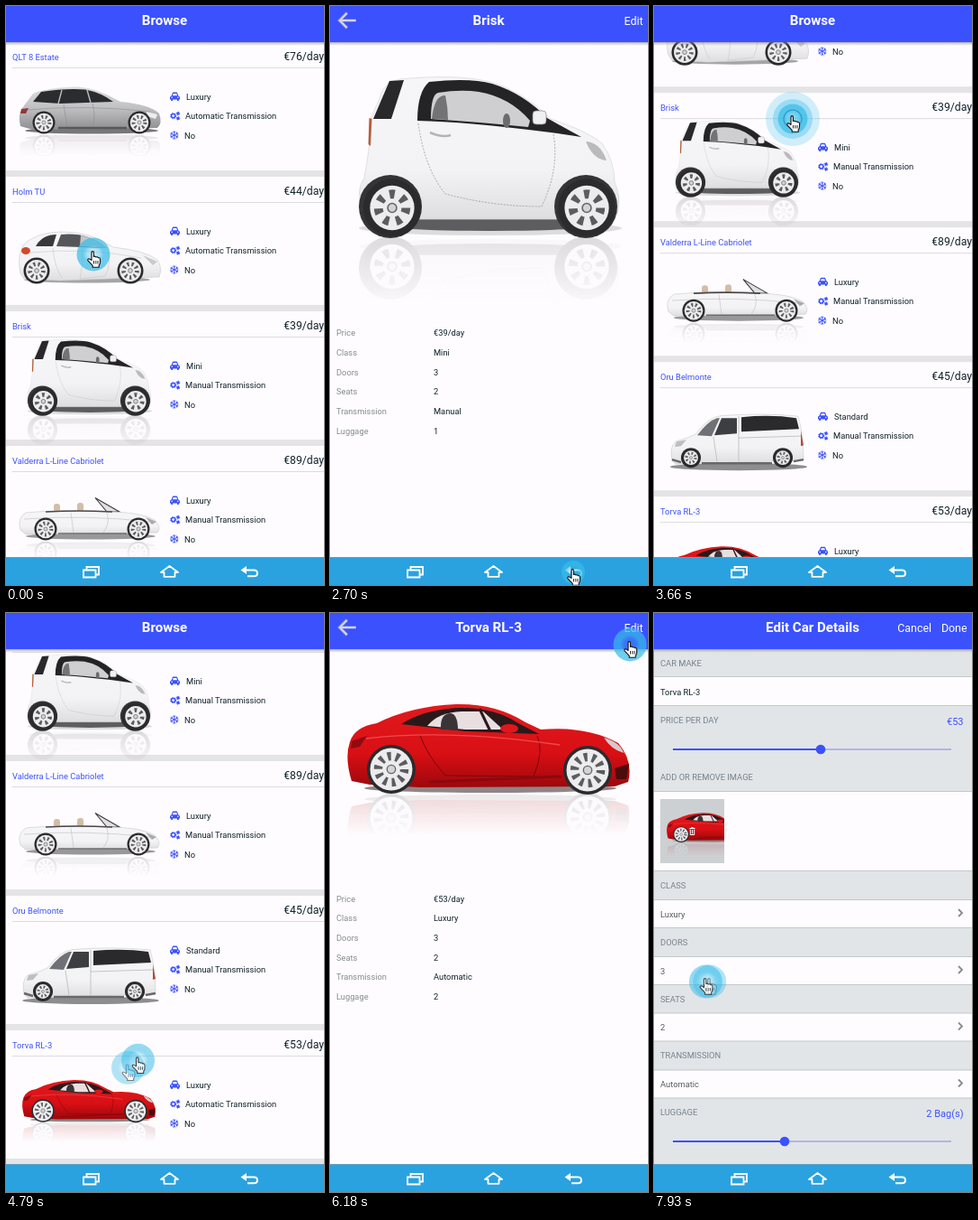
An HTML page that plays this animation: 353x641 px, repeating every 8000 ms.

```html
<!DOCTYPE html>
<html lang="en">
<head>
<meta charset="utf-8">
<title>Car browser</title>
<style>
html, body { margin: 0; width: 100%; height: 100%; overflow: hidden; background: #fefcfe; }
svg { display: block; }
text { font-family: Roboto, Arial, sans-serif; white-space: pre; }
</style>
</head>
<body>
<svg id="stage" width="353" height="641" viewBox="0 0 353 641"></svg>
<script>
const W = 353, LOOP = 8000;
const BLUE = '#3b51fe', INK = '#10222c', GREY = '#858b8f', PAGE = '#fefcfe';

// ---- drawing helpers ----
const text = (x, y, s, size = 9.35, fill = INK, anchor = 'start', weight = 400) =>
  `<text x="${x}" y="${y}" font-size="${size}" fill="${fill}" text-anchor="${anchor}" font-weight="${weight}">${s}</text>`;
const rect = (x, y, w, h, fill, more = '') =>
  `<rect x="${x}" y="${y}" width="${w}" height="${h}" fill="${fill}" ${more}/>`;
const path = (d, fill = 'none', more = '') => `<path d="${d}" fill="${fill}" ${more}/>`;
const line = (d, color, w, more = '') => path(d, 'none', `stroke="${color}" stroke-width="${w}" ${more}`);
const disc = (x, y, r, fill, more = '') => `<circle cx="${x}" cy="${y}" r="${r}" fill="${fill}" ${more}/>`;
const oval = (x, y, rx, ry, fill, more = '') =>
  `<ellipse cx="${x}" cy="${y}" rx="${rx}" ry="${ry}" fill="${fill}" ${more}/>`;
const group = (s, transform = '', more = '') => `<g transform="${transform}" ${more}>${s}</g>`;

function wheel(x, y, r, spokes = 9, rim = .82) {
  const hub = r * rim, step = 2 * Math.PI * hub * .62 / spokes;
  return disc(x, y, r, '#2b2b2d') + disc(x, y, hub, '#ececee') +
    disc(x, y, hub * .62, 'none', `stroke="#5c5c60" stroke-width="${hub * .4}" stroke-dasharray="${step * .42} ${step * .58}"`) +
    disc(x, y, hub * .2, '#d4d4d7', `stroke="#666" stroke-width="${r * .05}"`);
}

// ---- cars ----
const edge = 'stroke="#c8c8cc" stroke-width=".6"';
const shapes = {
  wagon: {
    ground: 102, mirror: true,
    art: oval(95, 98, 74, 3.5, '#77777a') +
      path('M16 93Q13 80 18 73L30 57Q45 50 80 49.500Q102 51 127 66Q160 69 170 79Q174 90 168 95L30 97Z', 'url(#silver)') +
      path('M30 66L39 55Q66 51 88 52.500Q106 56 119 66L60 68Z', '#2b2c30') +
      line('M62 53L58 68M90 53L94 67', '#bcbcc0', 1.4) +
      line('M22 75Q90 69 160 77M64 69L68 94M96 68Q100 82 96 94', '#8d8d92', .6) +
      path('M156 77L168 80L166 85L157 82Z', '#eeeef0') + path('M17 74L25 73L22 79L16 79Z', '#8e3a38') +
      line('M58 95H134', '#58585b', 2.5) +
      wheel(42, 89, 12.5) + wheel(148, 89, 12.5)
  },
  hatch: {
    ground: 118, mirror: false,
    art: oval(90, 114, 70, 3.5, '#a5a5a8') +
      path('M16 107Q12 90 19 76Q32 62 60 61Q92 60 119 78Q155 82 168 92Q174 101 170 111L60 115L20 113Z', 'url(#white)', edge) +
      path('M33 77Q40 64 56 64L52 77Z', '#39393d') + path('M56 77L61 64Q92 61 112 79Z', '#55565a') +
      path('M82 77L83 65Q98 67 112 79Z', '#c5c5c9') +
      line('M52 79Q54 100 62 112M84 79Q86 98 82 113L110 110Q118 95 112 80M27 84Q90 78 150 90', '#c8c8cc', .6) +
      oval(22, 82, 5, 4, '#cf4a2b') + path('M152 87L168 94L163 98Z', '#c9c9ce') +
      wheel(34, 104, 14.5) + wheel(138, 104, 14.5)
  },
  micro: {
    ground: 256, mirror: true,
    art: oval(178, 246, 146, 8, '#dcdcde') + oval(178, 241, 128, 8, '#5d5d60') +
      path('M36 222Q28 205 38 190Q46 150 44 128L55 102Q60 83 78 81Q140 75 178 84Q215 95 245 125Q285 138 302 152Q316 172 316 195Q324 212 319 230L290 236H70Z', 'url(#white)', 'stroke="#d6d6da" stroke-width=".7"') +
      path('M66 83L82 82L68 125L48 125Z', '#29292b') +
      path('M97 127Q97 95 110 84Q155 79 180 86Q215 97 241 124Q262 136 279 145L245 140Q150 128 97 127Z', '#242426') +
      path('M112 125Q112 98 120 96Q145 92 165 95Q200 101 222 127L220 134Q160 128 112 125Z', '#cfcfd2') +
      path('M113 125Q116 98 128 99Q131 112 131 126Z', '#737376') + oval(196, 127, 4, 8, '#6b6b6e') +
      rect(225, 116, 15, 15, '#f0f0f2', 'rx="4" stroke="#888" stroke-width=".7"') +
      line('M98 130Q105 180 128 208Q180 222 235 222Q255 180 248 142', '#8d8d91', .7, 'stroke-dasharray="2 1.5"') +
      line('M111 140Q124 146 134 143', '#b4b4b7', 2.6) +
      path('M284 150Q300 151 307 171Q292 170 284 150Z', '#b9b9be') +
      path('M43.500 124L46.500 125L45 155L42.500 153Z', '#b3603c') +
      disc(67, 222, 35, '#343436') + disc(284, 222, 35, '#343436') +
      wheel(69, 223.500, 32, 7, .77) + wheel(285, 223.500, 32, 7, .77)
  },
  cabrio: {
    ground: 105, mirror: true,
    art: oval(94, 100, 72, 3.5, '#98989b') +
      rect(53, 64, 7, 9, '#d3bda8', 'rx="3"') + rect(79, 63, 7, 10, '#d3bda8', 'rx="3"') +
      path('M99 57.500L126 73H112Z', '#e0e0e4', 'stroke="#3c3c40" stroke-width="1.1"') +
      path('M16 93Q12 80 22 74Q60 70 112 73Q150 73 165 82Q173 90 168 96L22 98Z', 'url(#white)', edge) +
      line('M44 73Q80 71 118 73', '#4c4748', 1.6) +
      line('M20 81Q90 76 160 84M72 74L75 96M112 74Q116 86 108 96', '#bebec3', .6) +
      path('M155 79L167 84L162 87Z', '#a9a9ae') + line('M58 97H134', '#6c6c70', 1.5) +
      wheel(44, 92, 12.5) + wheel(147, 92, 12.5)
  },
  van: {
    ground: 118, mirror: false,
    art: oval(94, 116, 76, 4, '#8d8d90') +
      path('M20 109Q17 94 24 88Q38 84 46 80Q60 61 74 59.500Q120 56 160 60Q166 80 166 109L24 113Z', 'url(#white)', edge) +
      path('M48 81Q60 65 70 62L73 62L64 82Z', '#707176') + path('M67 81L75 62H92V79Z', '#3d3e42') +
      path('M97 61Q130 58 158 62L161 74L97 77Z', '#2a2a2d') +
      line('M94 60V110M66 83L70 110M94 84L163 82', '#b9b9be', .8) +
      line('M20 108L30 111M53 112H131M155 110L166 108', '#68686c', 2.5) +
      path('M25 88L36 86L30 93L23 94Z', '#bdbdc2') + path('M163 76L166 92L163 93Z', '#b84a3b') +
      wheel(41, 106, 11, 8, .72) + wheel(143, 106, 11, 8, .72)
  },
  coupe: {
    ground: 200, mirror: true,
    art: oval(178, 194, 140, 5, '#8f8587') +
      path('M24 186Q16 160 22 143Q27 126 52 122Q90 103 140 101Q184 100 217 121L234 129Q285 125 320 144Q337 164 331 187L316 192L100 193L44 190Z', 'url(#red)') +
      path('M79 123Q104 107 142 105Q182 104 209 122L232 134L150 131Z', '#2a191b') +
      path('M108 125Q120 110 146 109L170 109L192 129L150 129Z', '#e9dfe1') +
      path('M123 129Q122 111 134 111Q142 112 142 130Z', '#3a3436') + line('M166 106L178 131', '#2a191b', 3) +
      oval(199, 128, 10, 5, '#e2161a') +
      line('M100 135Q106 155 128 180L226 181Q238 152 230 136', '#7d070b', 1) +
      line('M110 187L258 181', '#8d080c', 3) + line('M40 139Q130 128 255 146', '#ee4a4d', 1.4) +
      path('M304 138Q322 143 326 155Q312 151 304 138Z', '#d9c8ca') + path('M316 172L332 167L329 184L318 184Z', '#4b0c0e') +
      path('M24 142L41 136L33 148L23 150Z', '#8f0b0f') +
      wheel(68, 173, 27, 10, .87) + wheel(286, 174, 27, 10, .87)
  }
};

const car = (id, transform) => {
  const { ground, mirror } = shapes[id];
  const flip = group(`<use href="#${id}"/>`, `matrix(1 0 0 -1 0 ${2 * ground})`);
  return group((mirror ? group(flip, '', 'opacity=".16" mask="url(#fade)"') : '') + `<use href="#${id}"/>`, transform);
};

// ---- data ----
const cars = [
  ['QLT 8 Estate', 76, 'Luxury', 'Automatic', 'wagon', ''],
  ['Holm TU', 44, 'Luxury', 'Automatic', 'hatch', ''],
  ['Brisk', 39, 'Mini', 'Manual', 'micro', 'translate(8.7 -6.3) scale(.4746)', 1],
  ['Valderra L-Line Cabriolet', 89, 'Luxury', 'Manual', 'cabrio', ''],
  ['Oru Belmonte', 45, 'Standard', 'Manual', 'van', ''],
  ['Torva RL-3', 53, 'Luxury', 'Automatic', 'coupe', 'translate(8.9 7.3) scale(.4725)', 2]
];

// ---- pages ----
const carIcon = path('M1.6 3.8L2.7 .8Q3 0 3.8 0H7.2Q8 0 8.3 .8L9.4 3.8Q11 4.2 11 5.6V7.8H9.8V9.3H8V7.8H3V9.3H1.2V7.8H0V5.6Q0 4.2 1.6 3.8ZM3 3.6H8L7.3 1.4H3.7ZM1.4 5.7A.8.8 0 0 0 3 5.7A.8.8 0 0 0 1.4 5.7M8 5.7A.8.8 0 0 0 9.6 5.7A.8.8 0 0 0 8 5.7', BLUE, 'fill-rule="evenodd"');
const gear = (x, y, r) => disc(x, y, r, 'none', `stroke="${BLUE}" stroke-width="1.5"`) +
  disc(x, y, r + .9, 'none', `stroke="${BLUE}" stroke-width="1" stroke-dasharray="1.3 1.3"`);
const gearIcon = gear(3.7, 4.6, 2.2) + gear(9, 2, .9) + gear(9, 7.4, .9);
const flakeIcon = [0, 60, 120].map(a =>
  group(line('M0 -4.8V4.8M-1.6 -4.2L0 -2.6L1.6 -4.2M-1.6 4.2L0 2.6L1.6 4.2', BLUE, .9), `translate(4.8 4.7) rotate(${a})`)).join('');

const header = (title, extra = '') =>
  rect(0, 40, W, 4, 'url(#shade)') + rect(0, 0, W, 40, BLUE) +
  text(176, 21.3, title, 15.1, '#fff', 'middle', 700) + extra;
const action = (x, s) => text(x, 20.8, s, 12.4, '#fff', 'end');
const backArrow = line('M29 16H11M19 7.5L10.500 16L19 24.5', '#8f97c8', 3.2) +
  line('M28.500 16H11M18.700 8L10.700 16L18.700 24', '#d3d6ee', 1.8);

const row = ([name, price, kind, gears, id, place], i) => group(
  rect(0, 0, W, 142, PAGE) + text(7, 19.5, name, 9.35, BLUE) + text(353, 20.3, `€${price}/day`, 12.2, INK, 'end') +
  rect(7, 28, 346, 1, '#dcdce0') + car(id, place) +
  group(carIcon, 'translate(182 55.6)') + text(200, 63.7, kind) +
  group(gearIcon, 'translate(182 77)') + text(199, 85, gears + ' Transmission') +
  group(flakeIcon, 'translate(182 98.3)') + text(198, 106.5, 'No'),
  `translate(0 ${40 + 149 * i})`);

const listPage = rect(0, 40, W, 570, '#e4e4e7') + group(cars.map(row).join(''), '', 'id="rows"') + header('Browse');

function detailPage([name, price, kind, gears, id, , bags], y) {
  const facts = [['Price', `€${price}/day`], ['Class', kind], ['Doors', 3], ['Seats', 2], ['Transmission', gears], ['Luggage', bags]];
  return rect(0, 0, W, 610, PAGE) + car(id, '') +
    facts.map(([k, v], i) => text(7, y + i * 21.72, k, 9.3, GREY) + text(115, y + i * 21.72, v, 9.3)).join('') +
    header(name, backArrow + action(347.5, 'Edit'));
}

function editPage([name, price, kind, gears, id, , bags]) {
  const label = (y, s) => text(7, y + 3.4, s, 9.35, '#78828a');
  const value = (y, s) => text(343.5, y + 4.8, s, 11, BLUE, 'end');
  const band = (y, h) => rect(0, y, W, h, '#c3c8cc') + rect(0, y + 1, W, h - 2, PAGE);
  const pick = (y, s) => band(y - 16, 32) + text(7, y + 3.6, s, 9.35, '#555b60') +
    line(`M338 ${y - 5}L342 ${y - 1}L338 ${y + 3}`, '#858b90', 1.8);
  const slider = (y, x) => rect(21, y - 1, 309, 2, '#b5b4e6') + rect(21, y - 1, x - 21, 2, BLUE) + disc(x, y, 5.3, BLUE);
  const trash = line('M39.5 238.5H45.5M41.5 237.5H43.5M40.3 239.5V245.5H44.7V239.5M42.5 240V244.5', '#fff', 1);
  return rect(0, 0, W, 610, '#e1e5e8') +
    label(56, 'CAR MAKE') + band(70, 33) + text(7, 90.5, name) +
    label(118.5, 'PRICE PER DAY') + value(119, '€' + price) + slider(151, 185) +
    label(182, 'ADD OR REMOVE IMAGE') + band(197, 89) + rect(7, 206, 71, 71, '#cdd0d3') +
    group(car(id, 'translate(7.7 188) scale(.33)'), '', 'clip-path="url(#thumb)"') + trash +
    label(302, 'CLASS') + pick(333, kind) + label(365, 'DOORS') + pick(396, 3) +
    label(427.5, 'SEATS') + pick(458.5, 2) + label(490, 'TRANSMISSION') + pick(521.5, gears) +
    label(553, 'LUGGAGE') + value(553.5, bags + ' Bag(s)') + slider(585, 145) +
    header('Edit Car Details', action(308, 'Cancel') + action(347.5, 'Done'));
}

const navBar = rect(0, 610, W, 31, '#2aa2e0') + rect(0, 610, W, 1, '#5f9fc0') +
  line('M86 624.5H99.500V632.500H86ZM89.500 624V621H103V629.500H100', '#fff', 1.8) +
  line('M181.500 620L172 627H175.500V631.800H187.500V627H191Z', '#fff', 1.8, 'stroke-linejoin="round"') +
  line('M264 624.500H275Q279 624.500 279 628Q279 631.300 275 631.300H268', '#fff', 2) +
  path('M260.500 624.500L267 620V629Z', '#fff');

const hand = path('M5 10.500V1.900Q5 .6 6.200 .6Q7.400 .6 7.400 1.900V6.500Q9.400 5.600 9.900 7Q11.800 6.200 12.200 7.700Q14.500 7.200 14.500 9.300V12.500Q14.500 14.500 13.200 16V18.200H6.200V16.400L1 10.800Q.3 9.600 1.400 9Q2.600 8.500 5 10.500Z', '#fff', 'stroke="#111" stroke-width="1.1" stroke-linejoin="round"') +
  line('M7.500 11V14.500M9.800 11V14.500M12 11V14.500', '#111', .9);
const pointer = id => `<g id="${id}"><g class="press">` +
  disc(0, 0, 30, '#58c8ee', 'opacity=".28"') + disc(0, 0, 22, '#48c0ec', 'opacity=".4"') +
  disc(0, 0, 10, 'none', 'stroke="#1d4560" stroke-width="1.2"') +
  '</g><circle class="halo" fill="url(#halo)"/>' + group(hand, 'translate(-7 -4)') + '</g>';

const stop = (o, c, a = 1) => `<stop offset="${o}" stop-color="${c}" stop-opacity="${a}"/>`;
const shade = (id, stops) => `<linearGradient id="${id}" x2="0" y2="1">${stops}</linearGradient>`;
const $ = id => document.getElementById(id);
const pageGroup = (id, s) => group(s, '', `id="${id}"`);

$('stage').innerHTML = '<defs>' +
  shade('silver', stop(0, '#dededf') + stop(.5, '#c0c0c3') + stop(1, '#8e8e92')) +
  shade('white', stop(0, '#f6f6f8') + stop(.65, '#f3f3f5') + stop(1, '#dededf')) +
  shade('red', stop(0, '#e21a1e') + stop(.6, '#d80f14') + stop(1, '#9c080c')) +
  shade('shade', stop(0, '#777', .6) + stop(1, '#999', 0)) +
  shade('down', stop(0, '#fff') + stop(.48, '#fff', 0)) +
  '<mask id="fade" x="0" y="0" width="1" height="1" maskContentUnits="objectBoundingBox">' + rect(0, 0, 1, 1, 'url(#down)') + '</mask>' +
  '<radialGradient id="halo">' + stop(0, '#37bce8', .25) + stop(.35, '#37bce8', .35) + stop(.6, '#37bce8', .72) + stop(1, '#37bce8', .7) + '</radialGradient>' +
  '<clipPath id="thumb"><rect x="7" y="206" width="71" height="71"/></clipPath>' +
  Object.entries(shapes).map(([id, s]) => pageGroup(id, s.art)).join('') + '</defs>' +
  rect(0, 0, W, 641, PAGE) +
  pageGroup('list', listPage) + pageGroup('small', detailPage(cars[2], 365.3)) +
  pageGroup('sport', detailPage(cars[5], 319.6)) + pageGroup('edit', editPage(cars[5])) +
  navBar + pointer('ghost') + pointer('hand');

// ---- motion ----
const clamp = u => Math.min(1, Math.max(0, u));
const smooth = u => u * u * (3 - 2 * u);
const span = (t, a, b) => clamp((t - a) / (b - a));

// time, x, y, and 1 for a steady drag up to this point
const track = [
  [0, 97, 275], [440, 98, 276], [1180, 101, 422], [1720, 101, 422], [2200, 270, 627], [2850, 270, 627],
  [3170, 154, 366], [3200, 154, 366], [3660, 154, 125, 1], [3800, 154, 124], [4500, 118, 516],
  [4950, 158, 487], [5650, 158, 487], [6080, 333, 35], [7250, 333, 35], [7650, 70, 408], [8000, 56, 408]
];
function spot(t) {
  const i = Math.max(1, track.findIndex(k => k[0] >= t));
  const [t0, x0, y0] = track[i - 1], [t1, x1, y1, steady] = track[i];
  const u = span(t, t0, t1), e = steady ? u : smooth(u);
  return [x0 + (x1 - x0) * e, y0 + (y1 - y0) * e];
}

const scrollAt = t => 241.5 * span(t, 3200, 3660) + 81.5 * (1 - (1 - span(t, 3660, 4340)) ** 3);
const slide = (t, at) => smooth(span(t, at, at + 230));

function place(id, x) {
  const el = $(id);
  el.style.display = Math.abs(x) < W ? '' : 'none';
  el.setAttribute('transform', `translate(${x} 0)`);
}

function point(id, [x, y], r, press, alpha) {
  const el = $(id);
  el.setAttribute('transform', `translate(${x} ${y})`);
  el.setAttribute('opacity', alpha);
  el.querySelector('.press').setAttribute('opacity', press);
  el.querySelector('.halo').setAttribute('r', r);
}

function draw(t) {
  const open = slide(t, 1480) - slide(t, 2790), sport = slide(t, 5400), edit = slide(t, 7150);
  place('list', -W * (open + sport));
  place('small', W * (1 - open));
  place('sport', W * (1 - sport - edit));
  place('edit', W * (1 - edit));
  $('rows').setAttribute('transform', `translate(0 ${-scrollAt(t)})`);

  const now = spot(t), before = spot(Math.max(0, t - 85));
  const gap = Math.hypot(now[0] - before[0], now[1] - before[1]);
  const r = 18.5 - 5.5 * (span(t, 2100, 2200) - span(t, 2850, 2950));
  const press = span(t, 3170, 3230) - span(t, 3700, 3780);
  const blur = gap > 2 && !press;
  point('ghost', before, r, 0, blur ? .55 : 0);
  point('hand', now, r - 2 * press, press, blur ? .75 : 1);
}

function tick(now) {
  draw(now % LOOP);
  requestAnimationFrame(tick);
}
draw(0);
requestAnimationFrame(tick);
</script>
</body>
</html>
```
